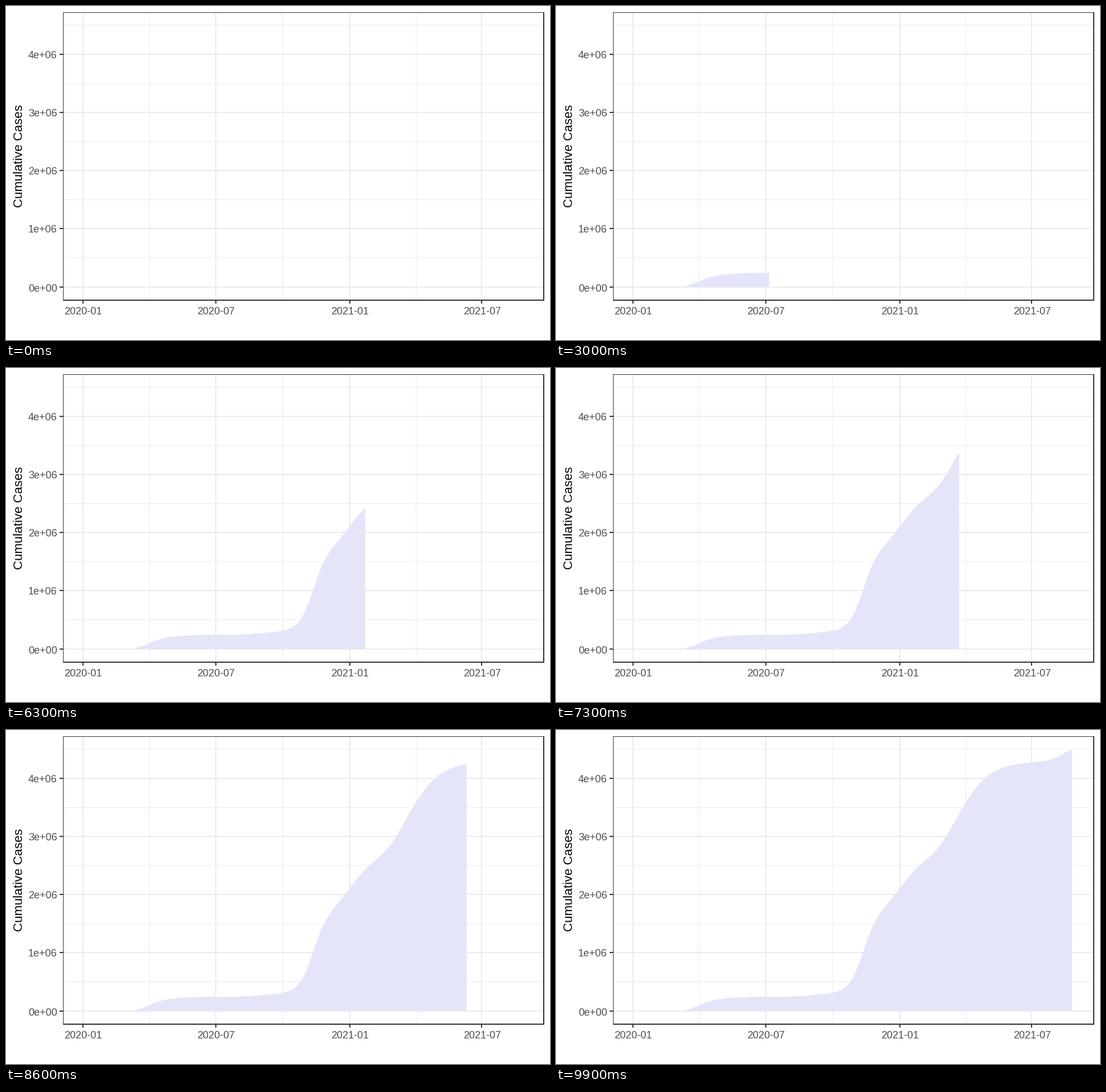
These frames come from a looping animation (954 px wide and 587 px high, 10 s). A matplotlib script:

```python
import numpy as np
import matplotlib.pyplot as plt
from matplotlib.animation import FuncAnimation
from matplotlib.patches import Polygon, Rectangle

W, H, DPI = 954, 587, 64
FRAMES, INTERVAL = 100, 100
X0, DAY_PX = 135.5, 1.2787      # 1 January 2020, pixels per day
Y0, MILLION_PX = 494.0, 102.25  # zero line, pixels per million cases
LEFT, TOP, RIGHT, BOTTOM = 100, 11, 942, 516
FIRST_DAY, LAST_DAY = 73, 601
GRID, DARK, TICK_TEXT, FILL = "#EBEBEB", "#333333", "#4D4D4D", "#E5E5FA"


def wave(day, size, middle, spread):
    return size / (1 + np.exp((middle - day) / spread))


def cases(day):
    """Cumulative cases in millions: a sharp first wave, then logistic ones."""
    return (0.239 * np.exp(-np.exp((89 - day) / 16.6))
            + wave(day, 0.060, 247, 14)
            + wave(day, 1.380, 315.7, 9.8)
            + wave(day, 0.830, 366.3, 14.4)
            + wave(day, 0.145, 434, 8)
            + wave(day, 1.625, 450, 21)
            + wave(day, 0.300, 591.5, 11))


def to_x(day):
    return X0 + DAY_PX * day


def to_y(millions):
    return Y0 - MILLION_PX * millions


fig = plt.figure(figsize=(W / DPI, H / DPI), dpi=DPI, facecolor="white")
ax = fig.add_axes([0, 0, 1, 1])
ax.set_xlim(0, W)
ax.set_ylim(H, 0)
ax.axis("off")


def box(x, y, w, h, color, z):
    ax.add_patch(Rectangle((x, y), w, h, facecolor=color, linewidth=0,
                           antialiased=False, zorder=z))


def label(x, y, text, px, color, **kw):
    ax.text(x, y, text, fontsize=px * 72 / DPI, color=color, va="baseline",
            family=["Liberation Sans", "DejaVu Sans"], zorder=5, **kw)


# Minor grid
for day in (91, 274, 456.5):
    box(int(to_x(day)), TOP, 1, BOTTOM - TOP, GRID, 1)
for k in range(5):
    box(LEFT, int(to_y(k + 0.5)), RIGHT - LEFT, 1, GRID, 1)

# Major grid, ticks and labels
for day, text in ((0, "2020-01"), (182, "2020-07"), (366, "2021-01"), (547, "2021-07")):
    x = int(to_x(day) - 1)
    box(x, TOP, 2, BOTTOM - TOP, GRID, 2)
    box(x, BOTTOM, 2, 7, DARK, 4)
    label(to_x(day), 542, text, 18, TICK_TEXT, ha="center")
for k in range(5):
    y = int(to_y(k) - 1)
    box(LEFT, y, RIGHT - LEFT, 2, GRID, 2)
    box(94, y, 7, 2, DARK, 4)
    label(89.7, y + 8.5, f"{k}e+0{6 if k else 0}", 18, TICK_TEXT, ha="right")
label(29, 263.5, "Cumulative Cases", 22.2, "black", ha="center",
      rotation=90, rotation_mode="anchor")

# Panel border
box(LEFT, TOP, 1, BOTTOM - TOP + 2, DARK, 4)
box(LEFT, TOP, RIGHT - LEFT + 2, 1, DARK, 4)
box(RIGHT, TOP, 2, BOTTOM - TOP + 2, DARK, 4)
box(LEFT, BOTTOM, RIGHT - LEFT + 2, 2, DARK, 4)

# Daily bars, merged into one stepped outline
days = np.arange(FIRST_DAY, LAST_DAY + 1)
edges = np.column_stack([to_x(days - 0.5), to_x(days + 0.5)]).ravel()
steps = np.column_stack([edges, np.repeat(to_y(cases(days)), 2)])
bars = Polygon([(0, 0), (0, 0), (0, 0)], facecolor=FILL, linewidth=0,
               antialiased=False, snap=False, visible=False, zorder=3)
ax.add_patch(bars)


def update(i):
    last = min(LAST_DAY, round(5.2 + 6.04 * i))
    n = last - FIRST_DAY + 1
    bars.set_visible(n > 0)
    if n > 0:
        outline = steps[:2 * n]
        bars.set_xy(np.vstack([(outline[0, 0], Y0), outline, (outline[-1, 0], Y0)]))
    return (bars,)


anim = FuncAnimation(fig, update, frames=FRAMES, init_func=lambda: update(0),
                     interval=INTERVAL, repeat=True, repeat_delay=0, blit=False)
plt.show()
```
